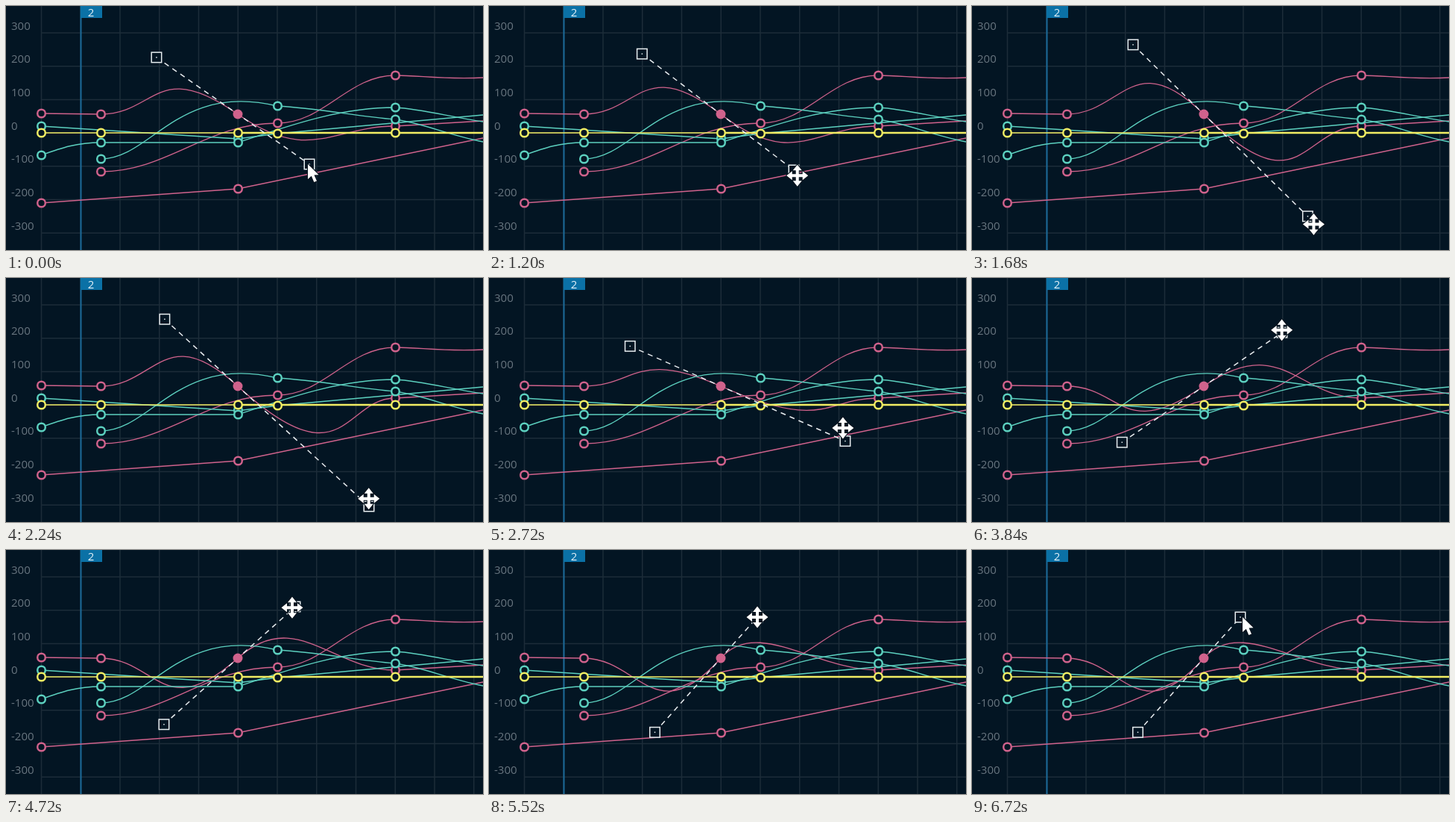
An HTML page with a canvas for the animation above (6800 ms loop, 640 by 327 pixels).

```html
<!DOCTYPE html>
<html lang="en">
<head>
<meta charset="utf-8">
<title>Curve editor</title>
<style>
html, body { margin: 0; width: 100%; height: 100%; overflow: hidden; background: #031523; }
canvas { display: block; }
</style>
</head>
<body>
<canvas width="640" height="327"></canvas>
<script>
const ctx = document.querySelector('canvas').getContext('2d');
const W = 640, H = 327, LOOP = 6800, STEP = 80;
const BG = '#031523', GRID = '#1c2c39', PINK = '#d0628c', CYAN = '#5cd0bf', YELLOW = '#f2ed63';
const FONT = '15px "Open Sans", "Noto Sans", sans-serif';
const PIVOT = { x: 311, y: 145 }, LEFT_LENGTH = 133;
const DRAG_START = 560, DRAG_END = 5600;

const curves = [
  [PINK, 1.3, 'M47 144L127 145M522 161L640 154'],
  [PINK, 1.3, 'M127 222C217 222 269 157 364 157C427 157 459 93 522 93C555 93 590 99 640 96'],
  [PINK, 1.3, 'M47 264L311 245L640 177'],
  [CYAN, 1.3, 'M47 161L311 178L364 171L640 146'],
  [CYAN, 1.3, 'M47 200C75 190 95 183 127 183H311C365 166 440 136 522 136C560 138 600 150 640 155'],
  [CYAN, 1.3, 'M127 205C195 205 230 102 364 134C420 137 470 148 522 152C560 157 590 172 640 182'],
  [YELLOW, 1.7, 'M47 170H311'],
  [YELLOW, 2.4, 'M311 170H640']
].map(([color, width, d]) => [color, width, new Path2D(d)]);

const markers = [
  [PINK, [[47, 144], [127, 145], [127, 222], [364, 157], [522, 93], [522, 161], [47, 264], [311, 245]]],
  [CYAN, [[47, 161], [311, 177], [47, 200], [127, 183], [311, 183], [522, 136], [127, 205], [364, 134], [522, 152]]],
  [YELLOW, [[47, 170], [127, 170], [311, 170], [364, 171], [522, 170]]]
];

// Dragged handle: time (ms), x, y, velocity x, velocity y (px/s)
const keys = [
  [900, 407, 212, 0, 0],
  [1200, 409, 220, 50, 75],
  [2240, 487, 306, 0, -112],
  [3200, 454, 128, -62, -125],
  [3840, 416, 73, 0, -50],
  [4720, 388, 76, -50, 12],
  [5520, 360, 90, 0, 0]
];

const arrow = new Path2D('M0 0V20L4.8 15.8L8.3 24L12 22.4L8.5 14.6L14.5 14.2Z');
const moveArm = 'M-2 0V-7H-6L0 -14.5L6 -7H2V0Z';
const moveCross = new Path2D();
for (let i = 0; i < 4; i++) {
  moveCross.addPath(new Path2D(moveArm), new DOMMatrix().rotate(i * 90));
}

function hermite(s, p0, m0, p1, m1) {
  const a = s * s, b = a * s;
  return (2 * b - 3 * a + 1) * p0 + (b - 2 * a + s) * m0 + (3 * a - 2 * b) * p1 + (b - a) * m1;
}

function handleAt(t) {
  t = Math.min(Math.max(t, keys[0][0]), keys.at(-1)[0]);
  const i = Math.max(1, keys.findIndex(k => k[0] >= t));
  const a = keys[i - 1], b = keys[i], span = b[0] - a[0], s = (t - a[0]) / span;
  const axis = n => hermite(s, a[n], a[n + 2] * span / 1000, b[n], b[n + 2] * span / 1000);
  return { x: axis(1), y: axis(2) };
}

function line(x1, y1, x2, y2) {
  ctx.beginPath();
  ctx.moveTo(x1, y1);
  ctx.lineTo(x2, y2);
  ctx.stroke();
}

function disc(x, y, r) {
  ctx.beginPath();
  ctx.arc(x, y, r, 0, 2 * Math.PI);
  ctx.fill();
}

function drawGrid() {
  ctx.fillStyle = BG;
  ctx.fillRect(0, 0, W, H);
  ctx.strokeStyle = GRID;
  ctx.lineWidth = 1.5;
  for (let x = 47.5; x < W; x += 52.75) line(x, 0, x, H);
  ctx.font = FONT;
  ctx.textAlign = 'left';
  ctx.fillStyle = '#68757f';
  for (let i = 0; i < 7; i++) {
    const y = 36 + 44.7 * i;
    line(47, y, W, y);
    ctx.fillText(300 - 100 * i, 7, y - 4.5);
  }
}

function drawPlayhead() {
  ctx.strokeStyle = '#1b6a99';
  ctx.lineWidth = 2;
  line(100.5, 0, 100.5, H);
  ctx.fillStyle = '#0b71a6';
  ctx.fillRect(100, 0, 29, 16);
  ctx.fillStyle = '#e4f1f8';
  ctx.textAlign = 'center';
  ctx.fillText('2', 114, 13.5);
}

// Overlapping handles shrink together so that they fit the segment.
function drawSelectedCurve(left, right) {
  const { x, y } = PIVOT;
  const segment = (endX, endY, reach, handle) => {
    const length = Math.abs(endX - x), dir = Math.sign(endX - x);
    const k = Math.min(1, length / (Math.abs(handle.x - x) + reach));
    ctx.moveTo(x, y);
    ctx.bezierCurveTo(x + (handle.x - x) * k, y + (handle.y - y) * k,
      endX - dir * reach * k, endY, endX, endY);
  };
  ctx.strokeStyle = PINK;
  ctx.lineWidth = 1.3;
  ctx.beginPath();
  segment(127, 145, 74, left);
  segment(522, 161, 84, right);
  ctx.stroke();
}

function drawMarkers() {
  ctx.lineWidth = 2.5;
  for (const [color, points] of markers) {
    ctx.strokeStyle = color;
    ctx.fillStyle = BG;
    for (const [x, y] of points) {
      disc(x + .5, y, 5.3);
      ctx.stroke();
    }
  }
}

function drawHandles(left, right) {
  ctx.strokeStyle = '#e8edf0';
  ctx.lineWidth = 1.5;
  ctx.setLineDash([7, 6]);
  line(left.x, left.y, right.x, right.y);
  ctx.setLineDash([]);
  ctx.fillStyle = PINK;
  disc(PIVOT.x, PIVOT.y, 6.5);
  for (const { x, y } of [left, right]) {
    ctx.fillStyle = BG;
    ctx.fillRect(x - 7, y - 7, 14, 14);
    ctx.strokeRect(x - 6.75, y - 6.75, 13.5, 13.5);
    ctx.fillStyle = '#e8edf0';
    ctx.fillRect(x - .75, y - .75, 1.5, 1.5);
  }
}

function drawCursor(t) {
  const dragging = t >= DRAG_START && t < DRAG_END;
  const { x, y } = handleAt(t + STEP);
  const shape = dragging ? moveCross : arrow;
  const shift = dragging ? 0 : t < DRAG_START ? -2 : 3;
  ctx.save();
  ctx.translate(x + shift, y);
  ctx.lineJoin = 'round';
  ctx.strokeStyle = '#06121c';
  ctx.lineWidth = 2;
  ctx.stroke(shape);
  ctx.fillStyle = '#fff';
  ctx.fill(shape);
  ctx.restore();
}

function draw(now) {
  const t = Math.floor(now % LOOP / STEP) * STEP;
  const right = handleAt(t);
  const angle = Math.atan2(right.y - PIVOT.y, right.x - PIVOT.x);
  const left = {
    x: PIVOT.x - LEFT_LENGTH * Math.cos(angle),
    y: PIVOT.y - LEFT_LENGTH * Math.sin(angle)
  };
  drawGrid();
  drawPlayhead();
  drawSelectedCurve(left, right);
  for (const [color, width, path] of curves) {
    ctx.strokeStyle = color;
    ctx.lineWidth = width;
    ctx.stroke(path);
  }
  drawMarkers();
  drawHandles(left, right);
  drawCursor(t);
}

const start = performance.now();
function tick() {
  draw(performance.now() - start);
  requestAnimationFrame(tick);
}
tick();
</script>
</body>
</html>
```
